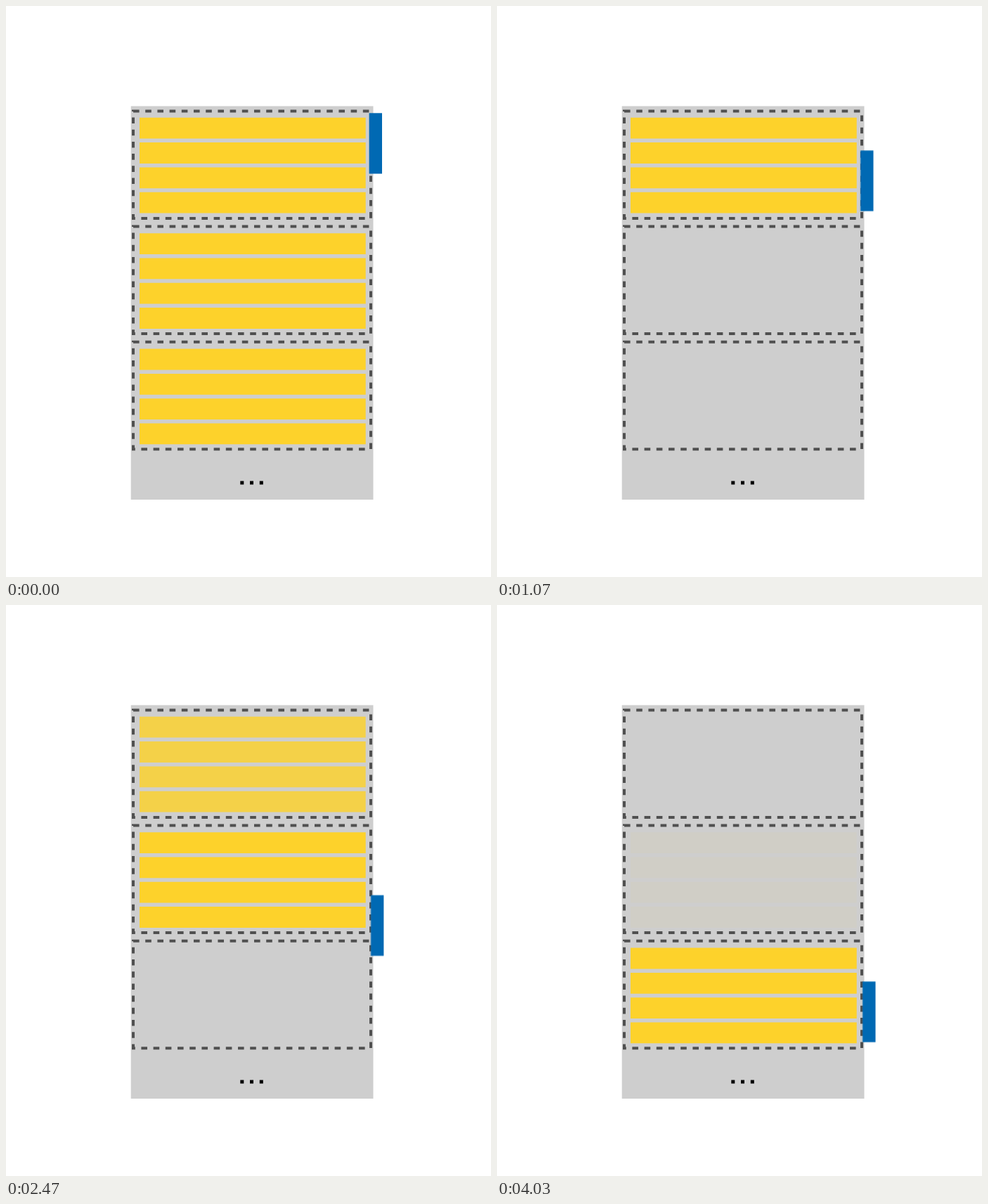
An HTML page for the animation above (4.16 s loop, 690 by 812 pixels).

```html
<!DOCTYPE html>
<html lang="en">
<head>
<meta charset="utf-8">
<title>Paged list scrolling</title>
<style>
  html, body { margin: 0; width: 100%; height: 100%; overflow: hidden; background: #fff; }
  svg { display: block; width: 690px; height: 812px; }

  .page { fill: none; stroke: #505050; stroke-width: 4; stroke-dasharray: 8.6; }
  .rows { fill: #fdd22b; }
  .thumb { fill: #0069b3; }

  .rows, .thumb { animation: 4160ms linear infinite; }
  .first { animation-name: first; }
  .second { animation-name: second; }
  .third { animation-name: third; }
  .thumb { animation-name: scroll; }

  @keyframes first {
    0%, 58.08% { opacity: 1; }
    65.29%, 100% { opacity: 0; }
  }
  /* Later pages start visible, then hide at once. */
  @keyframes second {
    0%, .7% { opacity: 1; }
    .701%, 34.38% { opacity: 0; }
    39.18%, 83.65% { opacity: 1; }
    90.87%, 100% { opacity: .04; }
  }
  @keyframes third {
    0%, .7% { opacity: 1; }
    .701%, 79.86% { opacity: 0; }
    84.66%, 100% { opacity: 1; }
  }
  @keyframes scroll {
    0% { transform: translate(0, 0); }
    .72% { transform: translate(0, 0); animation-timing-function: cubic-bezier(.42, 0, .58, 1); }
    97.36%, 100% { transform: translate(3.5px, 383.2px); }
  }
</style>
</head>
<body>
<svg viewBox="0 0 690 812">
  <defs>
    <path id="page" class="page" d="M181 149.5h338v152.4h-338z"/>
    <path id="rows" d="M190 158.8h321.7v29.8h-321.7z
                       m0 35.3h321.7v29.8h-321.7z
                       m0 35.3h321.7v29.8h-321.7z
                       m0 35.3h321.7v29.8h-321.7z"/>
  </defs>

  <rect x="177.7" y="142.4" width="344.8" height="559.6" fill="#cecece"/>

  <use href="#page"/>
  <use href="#page" y="164.1"/>
  <use href="#page" y="328.3"/>

  <g class="rows first"><use href="#rows"/></g>
  <g class="rows second"><use href="#rows" y="164.4"/></g>
  <g class="rows third"><use href="#rows" y="328.8"/></g>

  <path d="M333.3 675.5h5v5h-5z m13.7 0h5v5h-5z m13.8 0h5v5h-5z"/>
  <rect class="thumb" x="516.6" y="152.3" width="18.4" height="86.2"/>
</svg>
</body>
</html>
```
